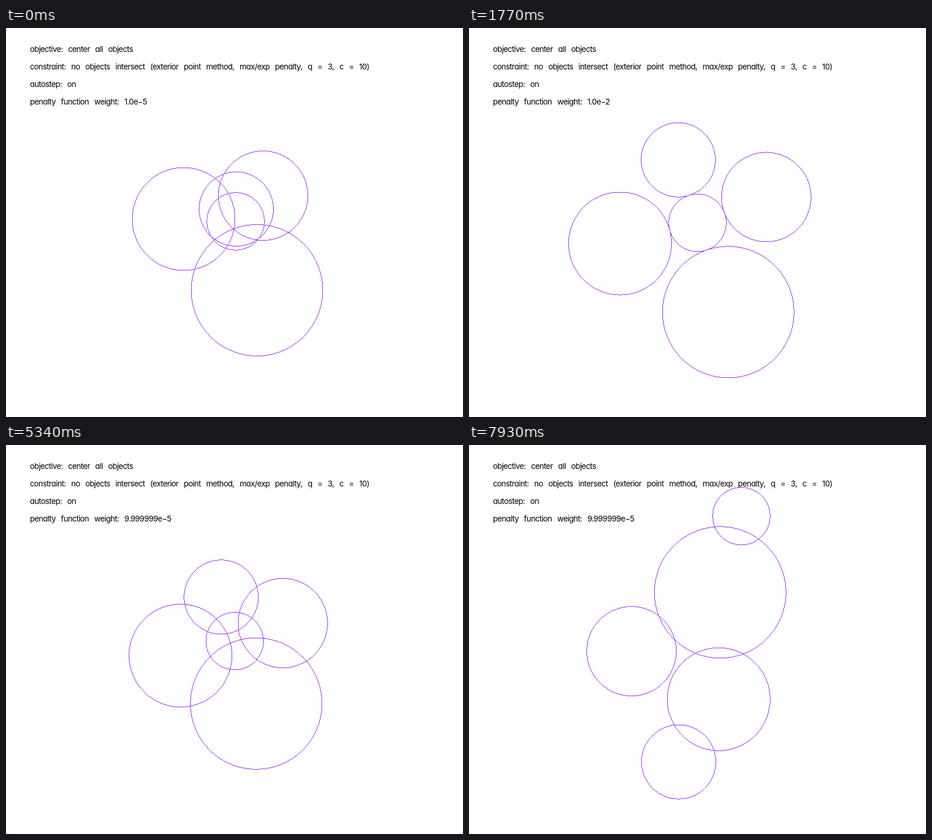
Write an HTML page with a canvas that moves like this. It is 782 px wide and 666 px high and loops after 7990 ms.

```html
<!DOCTYPE html>
<html lang="en">
<head>
<meta charset="utf-8">
<title>Circle packing with a penalty method</title>
<style>
  html, body { margin: 0; width: 100%; height: 100%; overflow: hidden; background: #fff; }
  canvas { position: absolute; left: 0; top: 0; }
  main {
    position: absolute;
    left: 41px;
    top: 21px;
    font: 400 13.5px/30px Inter, "Open Sans", sans-serif;
    font-feature-settings: "cv11";
    letter-spacing: -0.6px;
    word-spacing: 6px;
    white-space: nowrap;
    color: #000;
  }
</style>
</head>
<body>
<canvas id="stage" width="782" height="666"></canvas>
<main>
  <div>objective: center all objects</div>
  <div>constraint: no objects intersect (exterior point method, max/exp penalty, q = 3, c = 10)</div>
  <div>autostep: on</div>
  <div>penalty function weight: <span id="weight">1.0e−5</span></div>
</main>
<script>
const LOOP = 7990;
const STEP = 58;
const CENTER = { x: 392, y: 341 };
const RADII = [88, 63.5, 49.2, 76.5, 112.5];
const HUB = 2;

const point = (x, y) => ({ x, y });
const mix = (a, b, k) => point(a.x + (b.x - a.x) * k, a.y + (b.y - a.y) * k);
const scaled = (pose, k) => pose.map(p => mix(CENTER, p, k));

// At rest, every circle touches the smallest one at its own angle.
const packed = [165, -107, 0, -20.5, 71].map((degrees, i) => {
  const angle = degrees * Math.PI / 180;
  const distance = i === HUB ? 0 : RADII[i] + RADII[HUB];
  return point(391 + distance * Math.cos(angle), 333.5 + distance * Math.sin(angle));
});
const crowded = [point(304, 327), point(394, 310), point(393, 331), point(440, 287), point(429.5, 449)];
const parting = [point(255, 353), point(381, 292), point(388.5, 326), point(500.5, 272), point(435, 461.5)];
const chain = [point(427, 434.5), point(359, 541), point(465.5, 123.5), point(279, 353), point(429.5, 253)];

// Each move eases from the pose before it.
const MOVES = [
  { start: 50, end: 900, pose: parting },
  { start: 950, end: 1600, pose: packed },
  { start: 4080, end: 4750, pose: scaled(packed, 0.98) },
  { start: 5050, end: 5400, pose: scaled(packed, 0.69) },
  { start: 5430, end: 5670, pose: scaled(packed, 0) },
  { start: 7760, end: 7761, pose: scaled(chain, 1.17) },
  { start: 7770, end: 7920, pose: chain }
];

// Each press scales the weight by ten: up, then down, then up again.
const PRESSES = [50, 1150, 1650, 2230, 2800, 3810, 4080, 4640, 5050, 5430, 5670, 5970, 7170, 7530, 7760];

function weightText(t) {
  const count = PRESSES.filter(press => t >= press).length;
  const power = count <= 5 ? count - 5 : Math.abs(count - 12) - 7;
  if (power === 0) return '0.99999994';
  if (count < 4) return '1.0e−' + -power;
  return (power === -1 ? '9.9999994' : '9.999999') + 'e−' + (1 - power);
}

function poseAt(t) {
  let pose = crowded;
  for (const { start, end, pose: next } of MOVES) {
    if (t < start) break;
    const left = 1 - Math.min(1, (t - start) / (end - start));
    pose = pose.map((p, i) => mix(p, next[i], 1 - left * left));
  }
  return pose;
}

// One-pixel outline without smoothing.
function drawCircle({ x: cx, y: cy }, r) {
  const dot = (x, y) => ctx.fillRect(Math.floor(x), Math.floor(y), 1, 1);
  const reach = r * Math.SQRT1_2;
  for (let d = Math.floor(-reach); d <= reach; d++) {
    const x = Math.floor(cx + d) + 0.5;
    const y = Math.floor(cy + d) + 0.5;
    const h = Math.sqrt(r * r - (x - cx) ** 2);
    const w = Math.sqrt(r * r - (y - cy) ** 2);
    dot(x, cy - h);
    dot(x, cy + h);
    dot(cx - w, y);
    dot(cx + w, y);
  }
}

const ctx = document.getElementById('stage').getContext('2d');
const weight = document.getElementById('weight');
const origin = performance.now();

function render() {
  const t = (performance.now() - origin) % LOOP;
  const pose = poseAt(Math.floor(t / STEP) * STEP);
  ctx.clearRect(0, 0, 782, 666);
  ctx.fillStyle = '#9b30ff';
  RADII.forEach((r, i) => drawCircle(pose[i], r));
  weight.textContent = weightText(t);
  requestAnimationFrame(render);
}
render();
</script>
</body>
</html>
```
